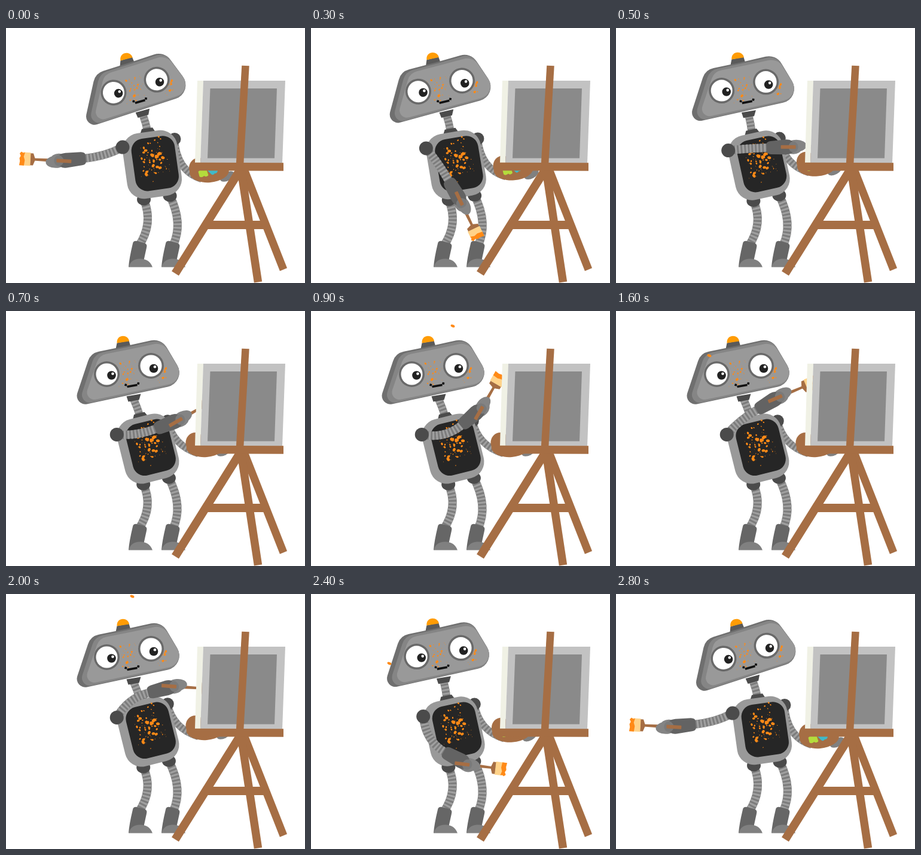
Recreate the animation shown at these times as an HTML page with a canvas. Size 500 by 426 pixels, loop 2.9 s.

```html
<!DOCTYPE html>
<html lang="en">
<head>
<meta charset="utf-8">
<title>Robot painter</title>
<style>
  html, body { margin: 0; width: 100%; height: 100%; overflow: hidden; background: #fff; }
  canvas { display: block; }
</style>
</head>
<body>
<canvas id="stage" width="500" height="426"></canvas>
<script>
const ctx = document.getElementById('stage').getContext('2d');
const LOOP = 2900, STEP = 100, ARM = 109, CUFF = 45;
const WOOD = '#a66e44', ORANGE = '#ff8a17', DARK = '#4b4b4b';

// Key moments of the stroke; the cuff follows from arm and brush
const STROKE = [
  { t: 0, arm: 168, brush: 183 },
  { t: 500, arm: -3, brush: 0 },
  { t: 900, arm: -23.5, brush: -60 },
  { t: 1300, arm: -40, brush: -40 },
  { t: 2000, arm: -28.5, brush: 4 },
  { t: 2400, arm: 47.6, brush: 7 },
  { t: 2800, arm: 168, brush: 183 }
];

const rad = d => d * Math.PI / 180;
const mix = (a, b, k) => a + (b - a) * k;
const ease = (t, from, to) => {
  const k = Math.min(1, Math.max(0, (t - from) / (to - from)));
  return k * k * (3 - 2 * k);
};
const polar = ([x, y], deg, len) => [x + len * Math.cos(rad(deg)), y + len * Math.sin(rad(deg))];

function strokeAt(t) {
  const i = Math.max(1, STROKE.findIndex(s => s.t >= t));
  const b = t > STROKE.at(-1).t ? STROKE.at(-1) : STROKE[i], a = STROKE[i - 1];
  const k = ease(t, a.t, b.t);
  const arm = mix(a.arm, b.arm, k), brush = mix(a.brush, b.brush, k);
  return { arm, brush, cuff: mix(arm, brush, 0.45) };
}

function fill(color, path) { ctx.fillStyle = color; ctx.fill(path); }
function shape(color, d) { fill(color, new Path2D(d)); }
function poly(color, ...pts) { shape(color, 'M' + pts.join(' ') + 'Z'); }
function oval(color, x, y, rx, ry = rx, turn = 0) {
  const p = new Path2D();
  p.ellipse(x, y, rx, ry, turn, 0, 7);
  fill(color, p);
}
function box(color, x, y, w, h, r = 0) {
  const p = new Path2D();
  p.roundRect(x, y, w, h, r);
  fill(color, p);
}
function line(color, width, d, dash = []) {
  ctx.strokeStyle = color;
  ctx.lineWidth = width;
  ctx.setLineDash(dash);
  ctx.stroke(new Path2D(d));
}
function tube(a, c, b, width) {
  const d = `M${a}Q${c} ${b}`;
  line('#7c7c7c', width, d);
  line('#a0a0a0', width, d, [3, 3]);
}
function plank(from, to, width) { line(WOOD, width, `M${from}L${to}`); }
function local([x, y], deg, draw) {
  ctx.save();
  ctx.translate(x, y);
  ctx.rotate(rad(deg));
  draw();
  ctx.restore();
}

// Paint specks, dense in the middle, mostly small
function specks(seed, count, x, y, w, h, size) {
  const rnd = () => (seed = (seed * 16807) % 2147483647) / 2147483647;
  const spread = () => rnd() + rnd() - 1;
  for (let i = 0; i < count; i++) {
    const r = 0.5 + size * rnd() ** 3;
    oval(ORANGE, x + spread() * w, y + spread() * h, r, r * 0.75, i);
  }
}

function legs(hips) {
  hips.forEach((hip, i) => {
    const x = i * 55;
    tube(hip, [247 + i * 50, 327], [222 + i * 57, 364], 14);
    oval(DARK, ...hip, 11.5, 10);
    shape('#666', `M${212 + x} 360q1-5 7-4l12 3q6 2 4 8l-7 32h-23q1-14 7-39Z`);
    shape('#808080', `M${205 + x} 399.500q4-14 19-14q16 0 21 14Z`);
  });
}

function palette() {
  oval('#808080', 370, 248, 13, 7, -0.5);
  oval(WOOD, 322, 234, 16, 17);
  oval(WOOD, 340, 240, 33, 18, -0.08);
  shape('#b4dc3c', 'M321.500 240q4-5 14-3l3 9q-4 4-7 1q-5 4-8 1Z');
  shape('#3fb9c8', 'M337 238l8-4l9 3q0 6-5 6q-3 4-6 1Z');
}

function torso() {
  poly(DARK, [-9, -61], [9, -61], [13, -53], [-13, -53]);
  box('#999', -46, -55, 92, 110, 28);
  box('#262626', -31.500, -45, 73, 88, 20);
  specks(71, 80, 3, -6, 29, 40, 3.2);
}

function headShape(color, scaleX, scaleY) {
  const p = new Path2D();
  p.moveTo(209, 57);
  p.arcTo(268, 44, 312, 118, 24);
  p.arcTo(312, 118, 120, 159, 24);
  p.arcTo(120, 159, 150, 69, 14);
  p.arcTo(150, 69, 209, 57, 24);
  ctx.save();
  ctx.translate(295, 95);
  ctx.scale(scaleX, scaleY);
  ctx.translate(-295, -95);
  fill(color, p);
  ctx.restore();
}

function eye(x, y, px, py) {
  oval('#696969', x, y, 21.5);
  oval('#fff', x, y, 18);
  oval('#222', px, py, 7.3);
  oval('#fff', px + 2, py - 2.7, 2.3);
}

function head() {
  poly(DARK, [210, 141], [234, 137], [231, 147], [213, 150]);
  poly('#5a5a5a', [194, 52], [214, 48], [217, 58], [192, 62]);
  shape('#ff9c05', 'M194 52C193 37 213 37 214.500 49Z');
  headShape('#6f6f6f', 1, 1);
  headShape('#858585', 0.95, 0.96);
  headShape('#999', 0.9, 0.87);
  specks(29, 46, 211, 102, 22, 30, 2.4);
  specks(53, 16, 270, 107, 11, 16, 2.2);
  eye(177, 104, 185, 106);
  eye(251, 90, 255.5, 94.5);
  line('#111', 3.6, 'M211 125L228 122M207 121.500L210.500 122.500M228 119L231.500 120');
}

function brushHand(hand, cuff, brush) {
  local(hand, brush, () => {
    poly(WOOD, [0, -3], [42, -2], [42, 2], [0, 3]);
    shape(WOOD, 'M40-2L43-10H48V10H43L40 2Z');
    box('#ffd38a', 47.500, -11, 13, 22);
    shape(ORANGE, 'M58-11H66L65-4L66 1L64 5L66 9L63 12L60 10L57 11L59 4L57-2Z');
  });
  local(hand, (cuff + brush) / 2, () => {
    oval('#848484', 5, -2, 17, 10);
    oval('#848484', 0, 4, 13, 8);
  });
  local(hand, cuff, () => {
    shape('#636363', 'M-45-6Q-45-10-38-11L-12-13Q0-13 0-5V5Q0 12-12 12L-38 11Q-45 10-45 6Z');
    oval('#7a7a7a', 0, 0, 8, 9);
  });
  local(hand, brush, () => box(WOOD, -21, -3, 25, 6, 1));
}

function paintingArm(shoulder, t) {
  const { arm, cuff, brush } = strokeAt(t);
  const hand = polar(shoulder, arm, ARM), wrist = polar(hand, cuff, -CUFF);
  const reach = Math.hypot(wrist[0] - shoulder[0], wrist[1] - shoulder[1]);
  tube(shoulder, polar(wrist, cuff, -0.52 * reach), polar(wrist, cuff, 3), 14);
  oval(DARK, ...shoulder, 11.5);
  brushHand(hand, cuff, brush);
}

function easel() {
  poly('#f0f1e5', [320, 88], [330, 88], [325, 226], [316, 225]);
  poly('#c2c2c2', [330, 88], [467, 88], [462, 226], [325, 226]);
  poly('#8a8a8a', [341.5, 101], [453, 101], [449, 217.5], [337, 217.5]);
  plank([400.5, 63], [391, 228], 12.5);
  plank([335, 329], [432, 329], 14);
  plank([396, 231], [464, 403.5], 13);
  plank([392, 230], [421.5, 424.5], 13.5);
  plank([394, 233], [283, 410], 14);
  plank([315, 231.5], [464, 232], 13.5);
}

// A flying drop of paint that passes x, y at the given moment
function drop(t, at, x, y, vx, vy) {
  const s = (t - at) / 1000;
  if (s >= -0.1 && s <= 0.4) oval(ORANGE, x + vx * s, y + vy * s + 450 * s * s, 3.6, 2.2, 0.4);
}

function draw(t) {
  const lean = ease(t, 100, 700) - ease(t, 2200, 2800), late = lean ** 5;
  const body = [mix(244.5, 237.5, lean), mix(228, 230, lean)], turn = mix(-8, -14, lean);
  const joint = (x, y) => polar(body, turn + Math.atan2(y, x) * 180 / Math.PI, Math.hypot(x, y));
  const nod = -6 * (1 - lean) ** 2, shift = [mix(2, -8.5, late), 1.5 * late];
  const far = joint(43, -37), px = -5.5 * lean, py = -14 * lean;
  const neck = joint(0, -57), throat = [222 + shift[0] - nod * 0.87, 146 + shift[1]];

  ctx.fillStyle = '#fff';
  ctx.fillRect(0, 0, 500, 426);
  legs([joint(-22, 56), joint(22, 56)]);
  tube(far, [285 + px, 239 + py], [327 + px, 252 + py], 12);
  oval(DARK, ...far, 10.5);
  local([px, py], 0, palette);
  tube(neck, [mix(neck[0], throat[0], 0.5) + 1, mix(neck[1], throat[1], 0.5)], throat, 13);
  local(body, turn, torso);
  local([215 + shift[0], 97 + shift[1]], nod, () => { ctx.translate(-215, -97); head(); });
  paintingArm(joint(-45, -35.5), t);
  easel();
  drop(t, 900, 237, 25, -400, 100);
  drop(t, 1300, 306, 79, -500, -150);
  drop(t, 2000, 211, 4, -200, 100);
}

let begin;
function tick(now) {
  begin ??= now;
  draw(Math.floor((now - begin) % LOOP / STEP) * STEP);
  requestAnimationFrame(tick);
}
draw(0);
requestAnimationFrame(tick);
</script>
</body>
</html>
```
